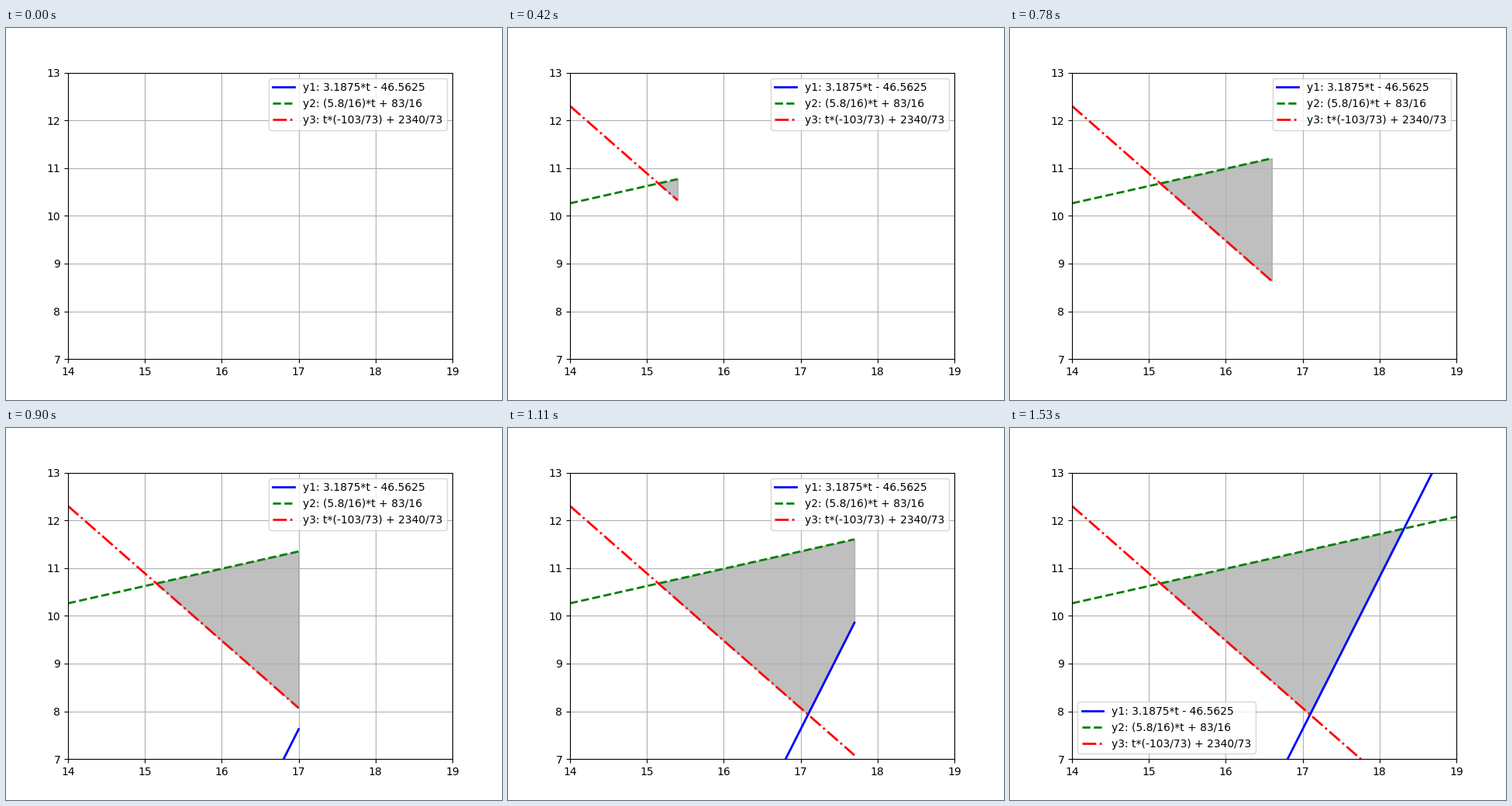
Recreate the animation shown at these times as a matplotlib script. Size 640 px wide and 480 px high, loop 2400 ms.

```python
import numpy as np
import matplotlib.pyplot as plt
from matplotlib.animation import FuncAnimation
from matplotlib.collections import PolyCollection

FRAMES, INTERVAL = 80, 30
T_START, T_END, T_STEP = 14, 19.1, 0.1
LEGEND_MOVE = 18.25  # past this the lines would run under the legend


def y1(t):
    return 3.1875 * t - 46.5625


def y2(t):
    return (5.8 / 16) * t + 83 / 16


def y3(t):
    return t * (-103 / 73) + 2340 / 73


fig, ax = plt.subplots(figsize=(6.4, 4.8), dpi=100)
ax.set_xlim(14, 19)
ax.set_ylim(7, 13)
ax.grid(True)

curves = [
    (y1, ax.plot([], [], "b-", lw=2, label="y1: 3.1875*t - 46.5625")[0]),
    (y2, ax.plot([], [], "g--", lw=2, label="y2: (5.8/16)*t + 83/16")[0]),
    (y3, ax.plot([], [], "r-.", lw=2, label="y3: t*(-103/73) + 2340/73")[0]),
]
area = PolyCollection([], color="gray", alpha=0.5)
ax.add_collection(area, autolim=False)
legend = ax.legend(loc="upper right")


def region(t):
    """Outline of the part below y2 and above both y1 and y3."""
    top = y2(t)
    bottom = np.maximum(y1(t), y3(t))
    inside = top > bottom
    if inside.sum() < 2:
        return []
    t, top, bottom = t[inside], top[inside], bottom[inside]
    upper = np.column_stack([t, top])
    lower = np.column_stack([t, bottom])
    return [np.vstack([upper, lower[::-1]])]


def update(frame):
    end = min(T_START + T_STEP * frame, T_END)
    t = np.linspace(T_START, end, 1000 if frame else 1)
    for func, line in curves:
        line.set_data(t, func(t))
    area.set_verts(region(t))
    legend.set_loc("lower left" if end > LEGEND_MOVE else "upper right")
    return [line for _, line in curves] + [area, legend]


anim = FuncAnimation(fig, update, frames=FRAMES, interval=INTERVAL,
                     repeat=True, repeat_delay=0, blit=False)
plt.show()
```
